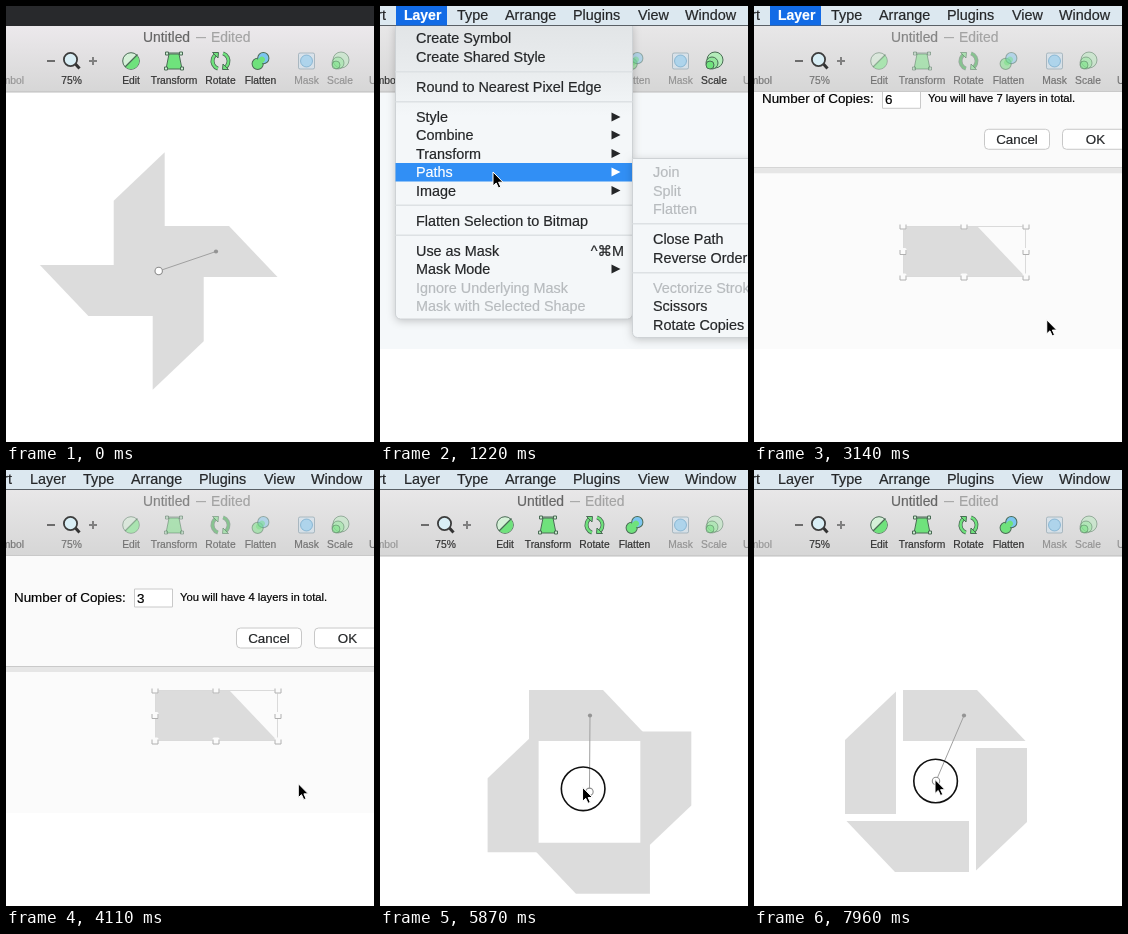
An HTML page with a canvas for the animation above (8 s loop, 368 by 436 pixels).

```html
<!DOCTYPE html>
<html>
<head>
<meta charset="utf-8">
<style>
html, body { margin: 0; width: 100%; height: 100%; overflow: hidden; background: #fff; }
canvas { display: block; width: 368px; height: 436px; }
</style>
</head>
<body>
<canvas></canvas>
<script>
const W = 368, H = 436, LOOP = 8000;
const canvas = document.querySelector('canvas');
const c = canvas.getContext('2d');
const dpr = window.devicePixelRatio || 1;
canvas.width = W * dpr;
canvas.height = H * dpr;

const FONT = '"Liberation Sans", "DejaVu Sans", sans-serif';
const INK = '#242628', MUTED = '#b7bbbe', BLUE = '#318ff5';
const GREEN = '#6fe27c', EDGE = '#4a6b55', SKY = '#7cc5ef';

// Moments (ms) where the state changes at once
const START = 90, LAYER_ON = 860, MENU = 950, SUBMENU = 1150, CHOSEN = 2750,
      LAYER_OFF = 3260, TYPED = 3760, CLOSED = 4460, COPIED = 4730, PRESS = 5610;

// Tracks: [time, value...]
const CURSOR = [[90, 72, 60], [700, 40, 10], [950, 40, 10], [1200, 113, 166], [1780, 113, 166],
  [1980, 262, 168], [2270, 292, 296], [2600, 293, 314], [4730, 292, 313.5], [4820, 292, 313.5],
  [5520, 204, 318], [5640, 203, 317.5], [5850, 203, 317.5], [6490, 189, 312.5],
  [6660, 186, 310.5], [7190, 181, 309.5]];
const PIVOT = [[5850, 210, 322], [6490, 193.5, 317.5], [6660, 187, 312], [7190, 182, 311]];
const SHEET = [[2980, 86], [3140, 162], [3270, 197], [4260, 197], [4460, 86]];

function track(keys, t) {
  const i = keys.findIndex(k => k[0] > t);
  if (i < 0) return keys[keys.length - 1].slice(1);
  if (!i) return keys[0].slice(1);
  const a = keys[i - 1], b = keys[i], u = (t - a[0]) / (b[0] - a[0]);
  return a.slice(1).map((v, n) => v + (b[n + 1] - v) * u);
}

function text(s, x, y, size, color = INK, align = 'left', weight = '') {
  c.font = `${weight} ${size}px ${FONT}`;
  c.textAlign = align;
  c.fillStyle = c.strokeStyle = color;
  c.lineWidth = 0.2;
  c.fillText(s, x, y);
  c.strokeText(s, x, y);
}

function rect(x, y, w, h, color) {
  c.fillStyle = color;
  c.fillRect(x, y, w, h);
}

function gradient(y0, y1, ...colors) {
  const g = c.createLinearGradient(0, y0, 0, y1);
  colors.forEach((color, i) => g.addColorStop(i / (colors.length - 1), color));
  return g;
}

function paint(fill, stroke, width = 1) {
  if (fill) { c.fillStyle = fill; c.fill(); }
  if (stroke) { c.strokeStyle = stroke; c.lineWidth = width; c.stroke(); }
}

function disc(x, y, r, fill, stroke, width) {
  c.beginPath();
  c.arc(x, y, r, 0, 7);
  paint(fill, stroke, width);
}

function poly(points, fill, stroke, width, open) {
  c.beginPath();
  points.forEach(p => c.lineTo(...p));
  if (!open) c.closePath();
  paint(fill, stroke, width);
}

function box(x, y, w, h, r, fill, stroke) {
  c.beginPath();
  c.roundRect(x, y, w, h, r);
  paint(fill, stroke);
}

function at(x, y, draw, angle = 0) {
  c.save();
  c.translate(x, y);
  c.rotate(angle);
  draw();
  c.restore();
}

const ICONS = {
  Edit() {
    disc(0, 0, 8.3, '#d5f0d8', EDGE);
    c.beginPath();
    c.arc(0, 0, 8, -Math.PI / 4, Math.PI * 3 / 4);
    paint(GREEN);
    poly([[-6, 6], [6.5, -6.5]], null, EDGE, 1.2, true);
  },
  Transform() {
    poly([[-8.5, -8], [8.5, -8]], null, EDGE, 1, true);
    poly([[-5, -7], [5, -7], [8, 8], [-8, 8]], GREEN, EDGE);
    for (const [x, y] of [[-7, -7.5], [7, -7.5], [8, 7.5], [-8, 7.5]]) box(x - 1.5, y - 1.5, 3, 3, 0, '#cfeed4', EDGE);
  },
  Rotate() {
    for (const a of [0, Math.PI]) at(0, 0, () => {
      c.beginPath();
      c.arc(0, 0, 8, 1.9, 4);
      paint(null, EDGE, 4);
      paint(null, GREEN, 2.4);
      poly([[-8, -8.5], [-2, -8.5], [-2.5, -3]], GREEN, EDGE);
    }, a);
  },
  Flatten() {
    at(0, 0, () => {
      disc(-4, 0, 5.6, GREEN, EDGE);
      disc(4, 0, 5.6, SKY, EDGE);
      box(-5, -3, 10, 6, 3, GREEN);
    }, -Math.PI / 4);
  },
  Mask() {
    box(-8, -8, 16, 16, 1.5, '#cfe5f3', '#6d8796');
    disc(0, 0, 6, SKY, '#4a8db5');
  },
  Scale() {
    disc(1, -1, 8, '#b4ecba', EDGE);
    disc(-2, 2, 6, '#93e69c', EDGE);
    disc(-4, 4, 4, GREEN, EDGE);
  }
};
const TOOLS = [['Edit', 125], ['Transform', 168], ['Rotate', 214.5], ['Flatten', 254.5],
  ['Mask', 300.5], ['Scale', 334]];

function drawToolbar(t, modal, single) {
  rect(0, 20, W, 66, gradient(20, 86, t < START ? '#ece9ec' : '#e8e7e8', '#d6d6d6'));
  rect(0, 85.5, W, 1, '#bdbdbd');

  text('Untitled', 137, 36, 13.9, modal ? '#858585' : '#666');
  rect(190, 31, 10, 1.2, '#aaa');
  text('Edited', 205, 36, 13.9, '#a3a3a3');

  const off = modal ? 0.55 : 0.36;
  const label = (s, x, on, align) => {
    c.globalAlpha = on ? 1 : off;
    text(s, x, 77.5, 10.3, '#333', align);
  };
  label('mbol', 18, single && !modal, 'right');
  label('75%', 65.5, !modal, 'center');
  label('U', 363, false);
  for (const [name, x] of TOOLS) {
    const on = !modal && (single ? !['Flatten', 'Mask'].includes(name)
                                 : !['Mask', 'Scale'].includes(name));
    label(name, x, on, 'center');
    c.globalAlpha = on ? 1 : 0.45;
    at(x, 55, ICONS[name]);
  }
  c.globalAlpha = 1;
  rect(41, 54, 8, 2, '#6c6c6c');
  rect(83, 54, 8, 2, '#808080');
  rect(86, 51, 2, 8, '#808080');
  poly([[69, 57.5], [73.5, 62.5]], null, '#333', 3, true);
  disc(64.5, 53.5, 6.6, '#d9eef5', '#3c3c3c', 1.8);
}

function drawMenuBar(t) {
  if (t < START) return rect(0, 0, W, 20, '#28292c');
  rect(0, 0, W, 20, '#dce8f0');
  rect(0, 19, W, 1, '#5a6066');
  const active = t >= LAYER_ON && t < LAYER_OFF;
  if (active) rect(16, 0, 51, 19.5, '#126be6');
  text('rt', 6, 14, 14.4, INK, 'right');
  [['Layer', 24], ['Type', 77], ['Arrange', 125], ['Plugins', 193], ['View', 258], ['Window', 305]]
    .forEach(([s, x], i) => active && !i ? text(s, x, 14, 14, '#fff', 'left', 'bold')
                                         : text(s, x, 14, 14.4));
}

// Blades: one trapezoid turned about the pivot
const BLADE = [[149, 220], [223, 220], [271.5, 271], [149, 271]];

function drawBlades([px, py]) {
  for (let i = 0; i < 4; i++) at(px, py, () =>
    poly(BLADE.map(([x, y]) => [x - px, y - py]), '#dcdcdc'), i * Math.PI / 2);
  poly([[px, py], [210, 245.5]], null, '#a0a0a0', 1, true);
  disc(210, 245.5, 2.1, '#949494');
  disc(px, py, 3.7, '#fff', '#8c8c8c', 1.1);
}

function drawHandle(x, y) {
  box(x - 3.5, y - 3.5, 7, 7, 1.5, '#fbfbfb');
  poly([[x - 3, y - 1.5], [x - 3, y + 3], [x + 3, y + 3], [x + 3, y - 1.5]], null, '#b0b0b0', 1, true);
}

function drawSelected(handles) {
  poly(BLADE, '#dcdcdc');
  if (!handles) return;
  c.strokeStyle = '#dadada';
  c.lineWidth = 1;
  c.strokeRect(149.5, 220.5, 122, 50);
  for (const x of [149, 210, 272]) for (const y of [220, 245.5, 271])
    if (x != 210 || y != 245.5) drawHandle(x, y);
}

// Menu rows: [label, centre y, mark]; marks: > submenu, - disabled
const MAIN = [['Create Symbol', 32], ['Create Shared Style', 50.5], ['Round to Nearest Pixel Edge', 80.5],
  ['Style', 111, '>'], ['Combine', 129, '>'], ['Transform', 147.5, '>'], ['Paths', 166, '>'],
  ['Image', 184.5, '>'], ['Flatten Selection to Bitmap', 214.5], ['Use as Mask', 244.5, '^⌘M'],
  ['Mask Mode', 263, '>'], ['Ignore Underlying Mask', 281.5, '-'], ['Mask with Selected Shape', 300, '-']];
const SUB = [['Join', 166, '-'], ['Split', 184.5, '-'], ['Flatten', 203, '-'], ['Close Path', 233],
  ['Reverse Order', 251.5], ['Vectorize Stroke', 281.5, '-'], ['Scissors', 300], ['Rotate Copies', 318.5]];

function drawMenu(x, y, w, h, fill, rows, lines, picked) {
  c.save();
  c.shadowColor = 'rgba(0,0,0,.22)';
  c.shadowBlur = 9 * dpr;
  c.shadowOffsetY = 2 * dpr;
  box(x, y, w, h, [0, 0, 5, 5], fill);
  c.restore();
  box(x, y, w, h, [0, 0, 5, 5], null, '#ced2d5');
  for (const l of lines) rect(x, l, w, 1.5, '#dde1e4');
  for (const [s, cy, mark] of rows) {
    const on = mark != '-' && picked(s, cy);
    const color = on ? '#fff' : mark == '-' ? MUTED : INK;
    if (on) rect(x, cy - 9, w, 18.5, BLUE);
    text(s, x + 20.5, cy + 5, 14.4, color);
    if (mark == '>') poly([[231.5, cy - 4.5], [240.5, cy], [231.5, cy + 4.5]], color);
    else if (mark && mark != '-') text(mark, 244, cy + 5, 14.4, color, 'right');
  }
}

function drawMenus(t, cursor) {
  const under = (s, cy) => Math.abs(cursor[1] - cy) < 9.3;
  // The toolbar shows faintly through the top of the menu
  drawMenu(15.5, 18, 237, 295, gradient(20, 110, '#e2e5e7', '#e9ecee', '#f4f7f9'), MAIN,
    [65, 95, 198.5, 228.5], t >= SUBMENU ? s => s == 'Paths' : under);
  if (t >= SUBMENU) drawMenu(252.5, 152.5, 140, 179, '#f4f7f9', SUB, [217, 266],
    (s, cy) => cursor[0] > 252 && under(s, cy));
}

function drawSheet(t) {
  const [bottom] = track(SHEET, t);
  if (bottom <= 86) return;
  const copies = t < TYPED ? 6 : 3, row = bottom - 70, mid = bottom - 29;
  c.save();
  c.beginPath();
  c.rect(0, 86, W, H);
  c.clip();
  rect(0, 86, W, bottom - 86, '#fafafa');
  rect(0, bottom - 1, W, 1, '#c9c9c9');
  rect(0, bottom, W, 5, '#e6e6e6');
  text('Number of Copies:', 8, row + 4.5, 13.4, '#000');
  box(128.5, row - 8, 38, 18, 0, '#fff', '#c9c9c9');
  text(copies, 131, row + 6, 13.4, '#000');
  text(`You will have ${copies + 1} layers in total.`, 174, row + 3.5, 11.25, '#000');
  for (const [s, x, w] of [['Cancel', 230.5, 65], ['OK', 308.5, 66]]) {
    box(x, mid - 10, w, 20, 4, '#fff', '#c8c8c8');
    text(s, x + w / 2, mid + 5, 13.4, INK, 'center');
  }
  c.restore();
}

function drawCursor(t, [x, y]) {
  if (t < START) return;
  if (t >= PRESS) disc(x + 0.6, y + 1.5, 21.8, null, '#111', 1.6);
  poly([[0, 0], [0, 14], [3.2, 11], [5.5, 16], [7.8, 15], [5.6, 10.2], [10, 10.2]]
    .map(p => [x + p[0], y + p[1]]), '#000', '#fff');
}

function draw(t) {
  c.setTransform(dpr, 0, 0, dpr, 0, 0);
  rect(0, 0, W, H, '#fff');
  const cursor = track(CURSOR, t);
  const single = t >= START && t < COPIED;
  const menuOpen = t >= MENU && t < CHOSEN;
  if (t >= MENU && t < CLOSED) rect(0, 86, W, 257, menuOpen ? '#f5f8fa' : '#fbfbfb');

  if (t < START) drawBlades([152.7, 265]);
  else if (single) drawSelected(t < CLOSED);
  else drawBlades(track(PIVOT, t));

  drawToolbar(t, t >= CHOSEN && t < CLOSED, single && t < CLOSED);
  drawSheet(t);
  if (menuOpen) drawMenus(t, cursor);
  drawMenuBar(t);
  drawCursor(t, cursor);
}

function frame() {
  draw(performance.now() % LOOP);
  requestAnimationFrame(frame);
}
frame();
</script>
</body>
</html>
```
